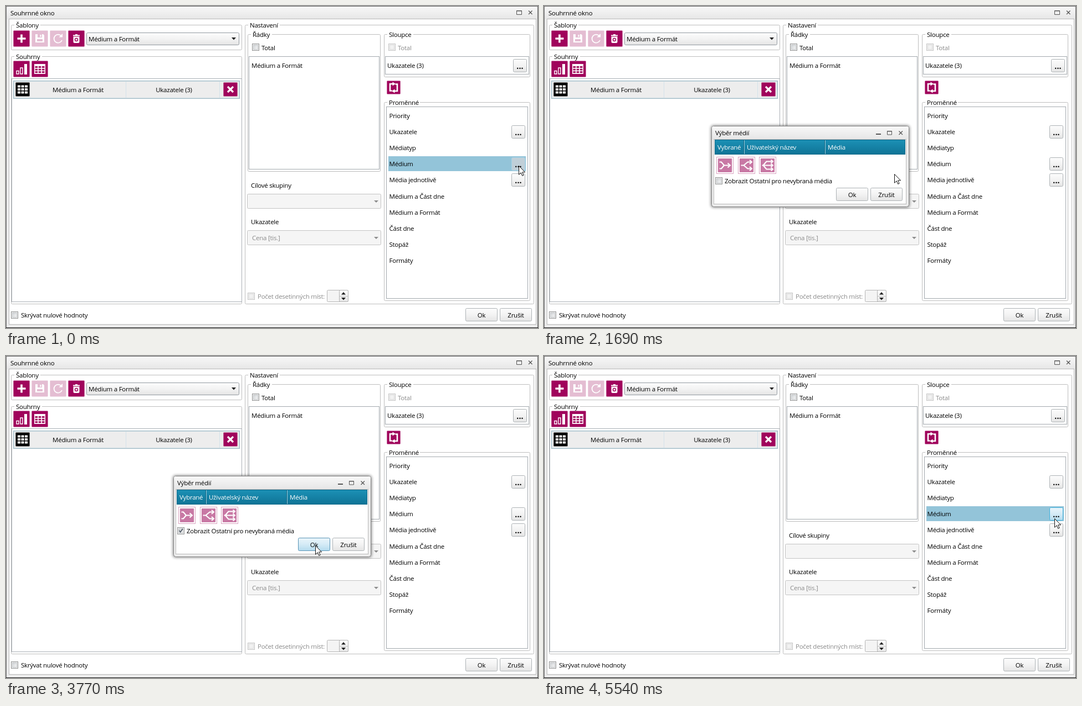
An HTML page for the animation above (5.87 s loop, 960x583 px).

```html
<!DOCTYPE html>
<html lang="cs">
<head>
<meta charset="utf-8">
<title>Souhrnné okno</title>
<style>
html, body { margin: 0; width: 100%; height: 100%; overflow: hidden; background: #fff; }
svg { display: block; width: 100%; height: 100%; }
text { font: 11.5px "Open Sans", "Noto Sans", sans-serif; letter-spacing: -.25px; fill: #000; white-space: pre; }
text.dots { font-size: 14px; font-weight: 700; letter-spacing: .2px; }
</style>
</head>
<body>
<svg id="stage" viewBox="0 0 960 583" preserveAspectRatio="none">
  <defs>
    <linearGradient id="bar" x2="0" y2="1"><stop stop-color="#f8f8f8"/><stop offset="1" stop-color="#e6e6e6"/></linearGradient>
    <linearGradient id="btn" x2="0" y2="1"><stop stop-color="#fcfcfc"/><stop offset=".5" stop-color="#f3f3f3"/><stop offset="1" stop-color="#e4e4e4"/></linearGradient>
    <linearGradient id="hot" x2="0" y2="1"><stop stop-color="#eaf5fb"/><stop offset=".5" stop-color="#d5ebf6"/><stop offset="1" stop-color="#b4dbee"/></linearGradient>
    <linearGradient id="head" x2="0" y2="1"><stop stop-color="#1c91b6"/><stop offset="1" stop-color="#0f7395"/></linearGradient>
    <linearGradient id="well" x2="1" y2="1"><stop stop-color="#cfd2d5"/><stop offset="1" stop-color="#f6f6f6"/></linearGradient>
    <filter id="soft" x="-10%" y="-20%" width="120%" height="140%"><feGaussianBlur stdDeviation="2.5"/></filter>
  </defs>
  <g id="main"></g>
  <g id="dialog"></g>
  <circle id="click" r="12" fill="#f8e83c" opacity=".82"/>
  <path id="cursor" d="M.5 .5V16.3L4.2 12.8 6.7 18.4 9.1 17.3 6.6 11.9H11.6Z" fill="#fff" stroke="#111" stroke-linejoin="round"/>
</svg>
<script>
const MAGENTA = '#a0045c', FADED = '#e4bdd2', PINK = '#c878a4', GREY = '#8a8a8a';
const $ = id => document.getElementById(id);

// drawing helpers; rectangles are given by their left, top, right and bottom
const fillBox = (x, y, r, b, fill, extra = '') =>
  `<rect x="${x}" y="${y}" width="${r - x}" height="${b - y}" fill="${fill}" ${extra}/>`;
const box = (x, y, r, b, fill = '#fff', line = '#aaa', extra = '') =>
  fillBox(x + .5, y + .5, r - .5, b - .5, fill, `stroke="${line}" ${extra}`);
const label = (x, y, s, extra = '') => `<text x="${x}" y="${y}" ${extra}>${s}</text>`;
const mid = (x, y, s, extra = '') => label(x, y, s, 'text-anchor="middle" ' + extra);
const line = (d, color, w = 1, extra = '') =>
  `<path d="${d}" fill="none" stroke="${color}" stroke-width="${w}" ${extra}/>`;
const shape = (d, fill) => `<path d="${d}" fill="${fill}"/>`;
const grey = `style="fill:${GREY}"`;

const group = (x, y, r, b, name, tx, tw) =>
  box(x, y, r, b, '#fff', '#bdbdbd', 'rx="2"') + fillBox(tx - 3, y - 1, tx + tw + 3, y + 2, '#fff') + label(tx, y + 4.5, name);
const button = (x, y, r, b, s, id = '') =>
  box(x, y, r, b, 'url(#btn)', '#adb2b5', `rx="2" ${id && `id="${id}"`}`) + mid((x + r) / 2, (y + b) / 2 + 4.5, s);
const dots = (x, y, id = '') =>
  box(x, y, x + 25, y + 24, 'url(#btn)', '#adb2b5', `rx="2" ${id && `id="${id}"`}`) + mid(x + 12.5, y + 17.5, '...', 'class="dots"');
const check = (x, y, off, id = '') =>
  box(x, y, x + 13, y + 13, off ? '#f4f4f4' : '#f6f6f6', off ? '#c4c4c4' : '#8e8f8f', id && `id="${id}"`) +
  box(x + 2, y + 2, x + 11, y + 11, off ? '#f1f1f1' : 'url(#well)', off ? '#dcdcdc' : '#c3c6c9', id && `id="${id}In"`);
const combo = (y, s) =>
  box(435, y, 677, y + 27, '#f5f5f5', '#c3c3c3', 'rx="2"') + shape(`M664 ${y + 12}h8l-4 4z`, '#8c8c8c') + label(444, y + 18, s, grey);
const tile = (x, y, s, fill, art) =>
  fillBox(x + .4, y + .4, x + s - .4, y + s - .4, fill, 'rx="1"') + `<g transform="translate(${x} ${y})">${art}</g>`;
const gridArt = (x, y, w, h, gap, c) => {
  let s = '';
  for (let i = 0; i < 9; i++) {
    const cx = x + (i % 3) * (w + gap), cy = y + Math.floor(i / 3) * (h + gap);
    s += fillBox(cx, cy, cx + w, cy + h, c);
  }
  return s;
};
const crossArt = (x, y, s, c, w) => line(`M${x} ${y}l${s} ${s}m0 ${-s}l${-s} ${s}`, c, w);

const variables = ['Priority', 'Ukazatele', 'Médiatyp', 'Médium', 'Média jednotlivě',
  'Médium a Část dne', 'Médium a Formát', 'Část dne', 'Stopáž', 'Formáty'];

function mainWindow() {
  return [
    fillBox(0, 0, 960, 583, '#ececec'), fillBox(0, 0, 960, 24, 'url(#bar)'),
    box(0, 0, 960, 583, 'none', '#666'), fillBox(0, 582, 960, 583, '#111'),
    box(5, 23, 957, 577, '#fff', '#b9b9b9'),
    label(8, 17, 'Souhrnné okno'),
    line('M921.5 8.5h9v7h-9zM921 9h10', '#555'), crossArt(943, 8.5, 6.5, '#555', 1.3),

    group(9, 34, 426, 80, 'Šablony', 18, 41),
    tile(13, 44, 30, MAGENTA, line('M15 7.5v15M7.5 15h15', '#fff', 3.6)),
    tile(46, 44, 30, FADED, shape('M7 7h14l2 2v13H7z', '#fff') + fillBox(11, 7, 19, 13, FADED) + fillBox(15.5, 8, 17.5, 12, '#fff') + fillBox(10, 16, 20, 20, FADED)),
    tile(79, 44, 30, FADED, line('M21 10.5A7.5 7.5 0 1 0 22 18', '#fff', 1.8) + shape('M23 6v6.500h-6.500z', '#fff')),
    tile(112, 44, 30, MAGENTA, shape('M9 8.500h12v2H9zM13 7h4v2h-4zM9.500 11.500h11v9.500q0 2-2 2h-7q-2 0-2-2z', '#fff') +
      `<circle cx="15" cy="17" r="2.5" fill="none" stroke="${MAGENTA}" stroke-width="1.4"/>`),
    box(145, 48, 421, 71, 'url(#btn)', '#9299a0', 'rx="2"'), label(149, 63.5, 'Médium a Formát'), shape('M407 57h8l-4 4.500z', '#222'),

    group(9, 91, 426, 540, 'Souhrny', 18, 44),
    tile(13, 99, 30, MAGENTA, line('M6 18.500h4v5.500h-4zM13 13h4v11h-4z', '#fff', 1.4) + fillBox(20, 6, 25, 25, '#fff')),
    tile(46, 99, 30, MAGENTA, fillBox(5, 6, 25, 24, '#fff') + gridArt(6.5, 10, 4.6, 3, 1.6, MAGENTA)),
    box(10, 131, 426, 536, '#fff', '#a9afb5'),
    box(13, 135, 422, 168, '#ededed', '#9db7c3'), box(14, 136, 421, 167, 'none', '#cfdde3'),
    line('M216.500 137v29M385.500 137v29', '#d3e2ea'),
    tile(17, 138, 26, '#000', gridArt(4, 5.5, 5, 4, 1.5, '#fff')),
    mid(130, 156, 'Médium a Formát'), mid(303, 156, 'Ukazatele (3)'),
    tile(392, 138, 26, MAGENTA, crossArt(8, 8, 10, '#fff', 3.2)),

    group(431, 34, 953, 540, 'Nastavení', 440, 51),
    group(436, 51, 676, 300, 'Řádky', 445, 32),
    check(444, 68), label(461, 79.5, 'Total'),
    box(438, 91, 674, 296, '#fff', '#a3a9ae'), label(443, 112, 'Médium a Formát'),
    label(442, 329, 'Cílové skupiny'), combo(340, ''),
    label(442, 395, 'Ukazatele'), combo(406, 'Cena [tis.]'),
    check(436, 519, true), label(454, 529.5, 'Počet desetinných míst:', grey),
    box(579, 514, 618, 536, '#f4f4f4', '#b4b4b4', 'rx="2"'), box(601, 514, 618, 536, 'url(#btn)', '#b4b4b4', 'rx="2"'),
    line('M602 525.500h15', '#c4c4c4'), shape('M605 522.500h8l-4-4.500z', '#222'), shape('M605 528h8l-4 4.500z', '#222'),

    group(682, 51, 946, 129, 'Sloupce', 691, 41),
    check(690, 68, true), label(707, 79.5, 'Total', grey),
    box(684, 91, 944, 124, '#fff', '#a3a9ae'), label(688, 112, 'Ukazatele (3)'), dots(915, 96),
    tile(687, 135, 25, MAGENTA, line('M11.500 6H6V18.500H9.500M13.500 19H19V6.500H15.500', '#fff', 2.6) +
      shape('M10.500 2.500l5.500 3.500-5.500 3.500zM14.500 15.500l-5.500 3.500 5.500 3.500z', '#fff')),
    group(682, 174, 946, 534, 'Proměnné', 691, 53),
    box(686, 182, 942, 530, '#fff', '#a3a9ae'),
    fillBox(690, 272, 938, 299, '#93c4d9', 'id="row"'),
    ...variables.map((s, i) => label(691.5, 203 + 29.1 * i, s)),
    dots(912, 216), dots(912, 274, 'more'), dots(912, 303),

    check(9, 553), label(27, 564, 'Skrývat nulové hodnoty'),
    button(829, 547, 887, 571, 'Ok'), button(891, 547, 949, 571, 'Zrušit')
  ].join('');
}

function mediaDialog() {
  const head = (x, s) => label(x, 260, s, 'style="fill:#fff"');
  const tool = (x, d, tips) => box(x, 273, x + 31, 304, '#fff', '#d9a3c0') +
    tile(x + 2.5, 275.5, 26, PINK, line(d, '#fff', 2.2) + line(tips, '#fff', 2));
  return [
    fillBox(301, 216, 660, 365, '#000', 'rx="5" opacity=".45" filter="url(#soft)"'),
    box(302, 217, 659, 364, '#ececec', '#858585', 'rx="4"'),
    fillBox(303, 218, 658, 241, 'url(#bar)', 'rx="3"'),
    box(306, 241, 654, 359, '#fff', '#bcbcbc'),
    label(309, 234, 'Výběr médií'),
    line('M599 232h9', '#555', 2), line('M619.500 226.500h8v6.500h-8zM619 227h9', '#555'), crossArt(640.5, 226.5, 6.5, '#555', 1.3),
    fillBox(308, 242, 652, 269, 'url(#head)'), box(308, 242, 652, 269, 'none', '#0f6a8a'),
    line('M361.500 243v25M507.500 243v25', '#9fd0e0'), line('M360.500 243v25M506.500 243v25', '#0c5f7d'),
    head(313, 'Vybrané'), head(366, 'Uživatelský název'), head(512, 'Média'),
    tool(311, 'M3 7h3.500l5 6H22M3 19h3.500l5-6', 'M18 9l4.500 4-4.500 4'),
    tool(350, 'M3 13h5l7-6h6M8 13l7 6h6', 'M18.500 3.500l4 3.500-4 3.500M18.500 15.500l4 3.500-4 3.500'),
    tool(388, 'M3 13h19M5 13l6-7h10M5 13l6 7h10', 'M19 3l3.500 3-3.500 3M19 10l3.500 3-3.500 3M19 17l3.500 3-3.500 3'),
    check(309, 310, false, 'tick'),
    line('M312.500 316l2.300 2.800 4-6', '#555f6b', 1.8, 'id="mark"'),
    label(326, 321, 'Zobrazit Ostatní pro nevybraná média'),
    button(527, 329, 585, 353, 'Ok', 'ok'), button(589, 329, 647, 353, 'Zrušit')
  ].join('');
}

$('main').innerHTML = mainWindow();
$('dialog').innerHTML = mediaDialog();

const LOOP = 5870;

// bursts of screen updates: first time, last time, count
const bursts = [[660, 1210, 9], [1280, 1830, 9], [1900, 2330, 7], [2470, 2600, 3], [2800, 3360, 9],
  [3430, 3570, 3], [3770, 3770, 1], [4170, 4720, 9], [4790, 5350, 9], [5410, 5540, 3]];
const ticks = [0];
for (const [a, b, n] of bursts)
  for (let i = 0; i < n; i++) ticks.push(n > 1 ? Math.floor((a + (b - a) * i / (n - 1)) / 10) * 10 : a);

// time, x, y
const path = [[0, 925, 289], [1140, 925, 289], [1210, 914, 290], [1280, 862, 291], [1420, 780, 291],
  [1690, 632, 304], [1760, 590, 312], [1830, 548, 318], [1970, 492, 319], [2110, 463, 317], [2330, 447, 315],
  [2730, 447, 315], [2800, 450, 317], [3080, 500, 334], [3360, 549, 344], [3570, 557, 344], [3770, 558, 343],
  [4450, 558, 343], [4650, 573, 342], [4720, 620, 335], [4790, 668, 320], [4860, 716, 302], [5000, 800, 297],
  [5350, 909, 297], [5410, 914, 297], [5540, 921, 294]];
// time, opacity, scale
const fade = [[660, 0, .93], [730, .08, .94], [860, .33, .96], [1000, .78, .985], [1070, 1, 1],
  [4240, 1, 1], [4310, .8, .985], [4450, .25, .955], [4520, 0, .94]];

function at(keys, t) {
  const i = keys.findIndex(k => k[0] > t);
  if (i < 0) return keys[keys.length - 1].slice(1);
  if (i === 0) return keys[0].slice(1);
  const a = keys[i - 1], b = keys[i], p = (t - a[0]) / (b[0] - a[0]);
  return a.slice(1).map((v, j) => v + (b[j + 1] - v) * p);
}

const paint = (id, fill, stroke) => { $(id).setAttribute('fill', fill); $(id).setAttribute('stroke', stroke); };
const show = (id, on) => $(id).setAttribute('visibility', on ? 'visible' : 'hidden');

function render(time) {
  const t = ticks.filter(v => v <= time).pop();
  const [x, y] = at(path, t).map(Math.round);
  const [alpha, scale] = at(fade, t);

  $('cursor').setAttribute('transform', `translate(${x} ${y})`);
  $('click').setAttribute('transform', `translate(${x} ${y})`);
  show('click', t >= 2470 && t < 2600);

  $('dialog').setAttribute('opacity', alpha);
  $('dialog').setAttribute('transform', `translate(480.5 290.5) scale(${scale}) translate(-480.5 -290.5)`);
  $('dialog').style.display = alpha > 0 ? '' : 'none';

  show('row', t < 660 || (t > 4720 && x >= 690));
  if (t < 660) paint('more', '#c0cfd8', '#a9d3e6');
  else if (t < 1210) paint('more', '#fbfdfe', '#2fb0e4');
  else if (t >= 5410) paint('more', 'url(#hot)', '#3fb0dc');
  else paint('more', 'url(#btn)', '#adb2b5');

  const hotTick = t >= 2470 && t < 4000 && y < 323;
  paint('tick', hotTick ? '#e2f3fb' : '#f6f6f6', hotTick ? '#3c7fb1' : '#8e8f8f');
  paint('tickIn', hotTick ? '#cfeaf7' : 'url(#well)', hotTick ? '#8cc6e2' : '#c3c6c9');
  show('mark', t >= 2530);

  const hotOk = x >= 527 && x < 585 && y >= 329;
  paint('ok', hotOk ? 'url(#hot)' : 'url(#btn)', hotOk ? '#5a94b5' : '#adb2b5');
}

const start = performance.now();
function frame() {
  render((performance.now() - start) % LOOP);
  requestAnimationFrame(frame);
}
frame();
</script>
</body>
</html>
```
